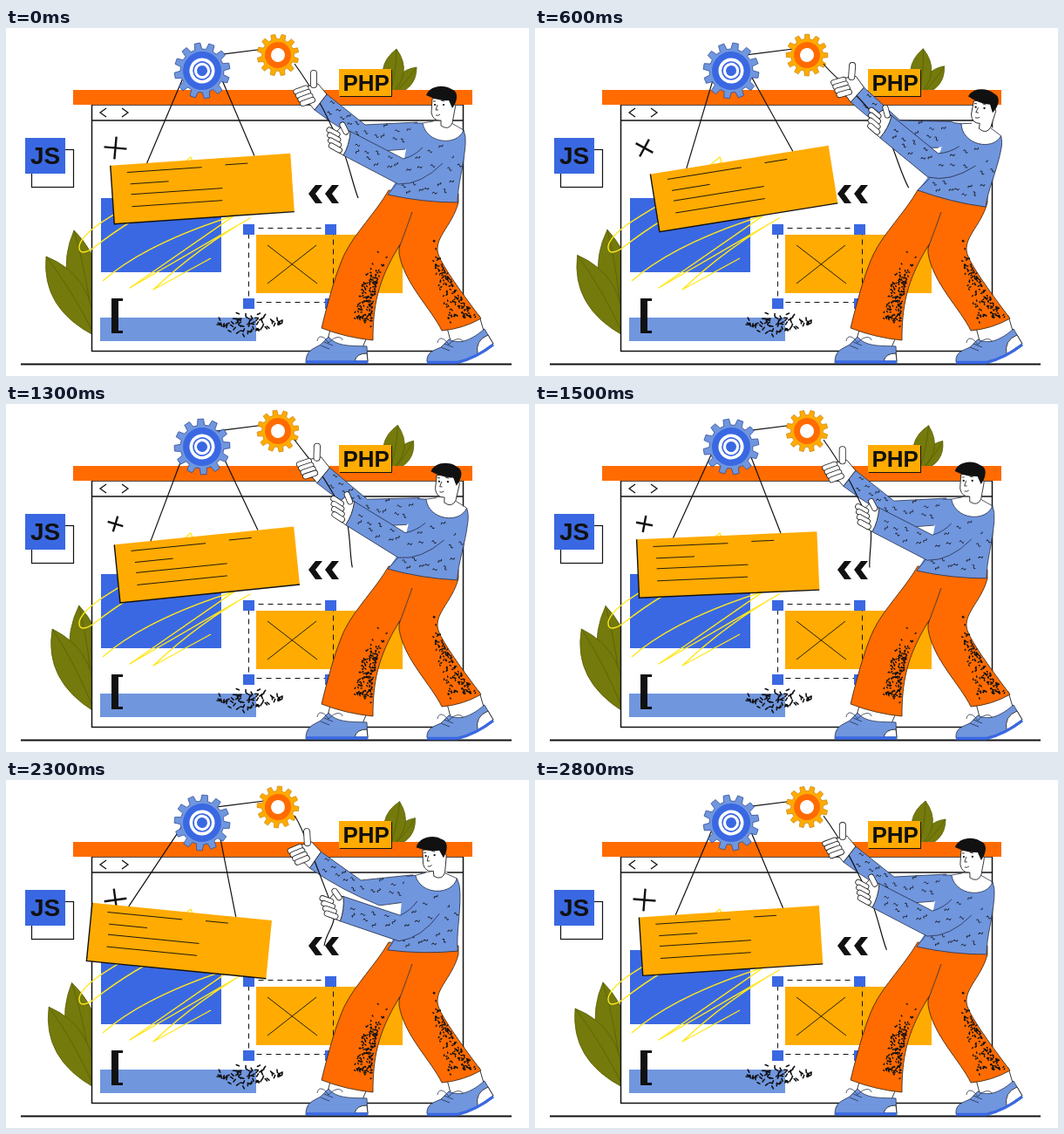
An HTML page for the animation above (2900 ms loop, 600x399 px).

```html
<!DOCTYPE html>
<html lang="en">
<head>
<meta charset="utf-8">
<title>Building a web page</title>
<style>
html, body { margin: 0; width: 100%; height: 100%; overflow: hidden; background: #fff; }
svg { display: block; width: 600px; height: 399px; }
text { font: bold 26px "Liberation Sans", Arial, sans-serif; fill: #111; }
.ink { fill: none; stroke: #111; }
.skin { fill: #fff; stroke: #222; stroke-width: .9; stroke-linejoin: round; }
.line { fill: none; stroke: #26304a; stroke-width: .8; stroke-linejoin: round; }
.pants { fill: #ff6b00; stroke: #33200a; stroke-width: .8; }
.leaf { fill: #747a0b; stroke: #5a6007; stroke-width: .8; }
.dots { fill: none; stroke: #111; stroke-linecap: round; }
.finger { fill: none; stroke-linecap: round; }
.blue { fill: #3a68e2; }
.soft { fill: #7096de; }
.gold { fill: #ffab02; }
</style>
</head>
<body>
<svg viewBox="0 0 600 399" xmlns="http://www.w3.org/2000/svg">
  <defs>
    <path id="laces" d="M-9 3l10 4M-5 -1l10 4M0 0C-6 -9 -12 -9 -13 -2M0 0C7 -8 15 -8 16 -3"/>
  </defs>
  <rect width="600" height="399" fill="#fff"/>
  <g id="leaves"></g>

  <!-- window -->
  <rect x="98.5" y="88" width="426" height="282.5" fill="#fff" stroke="#111" stroke-width="1.5"/>
  <path class="ink" d="M98 106H525" stroke-width="1.4"/>
  <rect x="77" y="71" width="458" height="17" fill="#ff6b00"/>
  <path class="ink" d="M115 92L108 97L115 102M133 92L140 97L133 102" stroke-width="1.3"/>

  <!-- labels -->
  <rect class="ink" x="29.5" y="139.5" width="48" height="43" stroke-width="1.2"/>
  <rect class="blue" x="22" y="126" width="46" height="41"/>
  <text x="28" y="156" style="font-size:28px">JS</text>
  <rect x="383" y="48" width="60" height="31" fill="#111"/>
  <rect class="gold" x="382" y="47" width="60" height="31"/>
  <text x="386.500" y="72">PHP</text>

  <!-- page items -->
  <rect class="blue" x="109" y="195" width="138" height="85"/>
  <rect class="soft" x="108" y="332" width="179" height="27"/>
  <path id="barDots" class="dots" stroke-width="1.6"/>
  <path d="M121 310H134V313H129V347H134V350H121Z" fill="#111"/>
  <path d="M200 158L212 148L214 153C180 190 90 222 84 250C83 262 96 256 103 250Q150 214 190 198M111 290Q160 247 262 215L142 298L280 218Q220 252 169 300L235 264" fill="none" stroke="#ffe71f" stroke-width="1.4" stroke-linejoin="round"/>
  <rect class="gold" x="287" y="237" width="168" height="67"/>
  <path class="ink" d="M300 249L357 293M356 249L300 293" stroke-width=".9"/>
  <rect class="ink" x="278.5" y="229.5" width="97" height="85" stroke-width="1" stroke-dasharray="6 5"/>
  <path class="blue" d="M272 225h13v12h-13zM366 225h13v12h-13zM272 310h13v12h-13zM366 310h13v12h-13z"/>
  <path d="M355 180h8l-8 10l8 11h-8l-8 -11zm19 0h8l-8 10l8 11h-8l-8 -11z" fill="#111"/>
  <path id="plus" class="ink" stroke-width="2.4"/>

  <!-- hanging board and gears -->
  <g id="board">
    <rect class="gold" x="-103.5" y="-33.5" width="207" height="67"/>
    <path class="ink" d="M-103.5 -33.5V33.5H103.5" stroke-width="1.4"/>
    <path class="ink" d="M-85 -24.5H1M28 -25.5H54M-82 -11H-38M-82 1H23M-82 15H22" stroke-width=".9"/>
  </g>
  <path id="ropes" class="ink" stroke-width="1.2"/>
  <g id="gearBlue">
    <path class="soft" stroke="#2c4a92" stroke-width=".7"/>
    <circle class="blue" r="22"/>
    <circle r="14.5" fill="#fff"/>
    <circle r="10" fill="none" stroke="#3a68e2" stroke-width="1.7"/>
    <circle class="blue" r="6"/>
  </g>
  <g id="gearGold">
    <path class="gold" stroke="#b87300" stroke-width=".5"/>
    <circle r="15" fill="#ff6b00"/>
    <circle r="8" fill="#fff"/>
  </g>

  <!-- ground and legs -->
  <path class="ink" d="M17 385.5H580" stroke-width="2"/>
  <path class="skin" d="M373 342L368 361L408 369L414 354ZM505 340L512 366L550 354L543 330Z"/>
  <g class="line">
    <path class="soft" d="M344 383C344 370 352 368 361 363L370 354C380 366 397 364 414 365L415 384H344Z"/>
    <path class="skin" d="M414 373Q402 373 400 382H415Z"/>
    <path class="soft" d="M483 383C482 372 490 370 499 366L508 357C522 364 536 356 549 345L559 362Q542 377 519 384Z"/>
    <path class="skin" d="M553 352Q538 358 541 374L559 362Z"/>
    <path d="M344 383H415M483 383.500H518Q540 378 559 363" stroke="#3a68e2" stroke-width="3.5"/>
    <use href="#laces" x="370" y="361"/>
    <use href="#laces" x="508" y="363"/>
  </g>
  <path class="pants" d="M452 185L519 190V200C512 228 488 242 497 262Q504 279 545 333Q524 345 500 347C488 322 456 292 451 258Z"/>
  <path class="pants" d="M439 186C424 212 400 235 388 260Q376 286 362 344Q390 355 421 358C421 320 426 290 451 250L490 190Z"/>
  <path d="M460 188H516L517 205L490 240L451 248Z" fill="#ff6b00"/>
  <path class="line" d="M466 211Q460 228 451 252"/>
  <path id="legDots" class="dots" stroke-width="1.4"/>

  <!-- upper body -->
  <g class="lean">
    <g class="far">
      <path class="soft" d="M368 76L412 111L472 108L492 125L458 139L432 141Q390 122 354 94Z"/>
      <path class="line" d="M472 108L412 111L368 76L354 94Q390 122 432 141L458 139"/>
      <path id="farDots" class="dots" stroke-width=".9"/>
    </g>
    <path d="M475 110L489 107L511 106L525 119L518 133H490Z" fill="#fff"/>
    <path class="soft" d="M466 109H478C482 133 518 136 525 117Q528 124 527 134C525 160 518 180 518 200Q478 200 438 191Q456 165 459 139Z"/>
    <path class="line" d="M468 109H478C482 133 518 136 525 117Q528 124 527 134C525 160 518 180 518 200Q478 200 438 191L450 176M478 109L490 107M511 109L525 117"/>
    <path id="bodyDots" class="dots" stroke-width=".9"/>
    <path class="skin" d="M489 81L488 97Q490 107 499 106V112Q508 118 512 109L515 93Q517 85 511 88L510 79Z"/>
    <path d="M482 77C486 66 502 64 511 70C520 73 518 84 512 92L508 83Q496 84 482 77Z" fill="#111"/>
    <path class="ink" d="M490 84h3M499 83l4 1M495 88l-2 6h3M493 100q3 1 5 -1" stroke-width=".8"/>
    <path class="dots" d="M492 88h.1M502 88h.1" stroke-width="2.2"/>
  </g>

  <path id="lead" class="ink" stroke-width="1.2"/>

  <g class="lean">
    <g class="far">
      <path class="skin" d="M368 76L358 64L340 68L338 84L349 88L354 94Z"/>
      <g id="fist"></g>
    </g>
    <g id="near">
      <path class="soft" d="M394 118L456 150L484 130L512 148Q482 180 450 179L387 146Z"/>
      <path class="line" d="M478 137Q468 147 456 150L394 118L387 146L450 179Q476 180 501 155"/>
      <path id="nearDots" class="dots" stroke-width=".9"/>
      <path class="skin" d="M395 119L384 114L374 124L376 139L387 146Q394 134 395 119Z"/>
      <g id="palm"></g>
    </g>
  </g>
</svg>
<script>
const LOOP = 2900, STEP = 100, REST = 2850, RAD = Math.PI / 180;
const $ = id => document.getElementById(id);
const set = (el, name, value) => el.setAttribute(name, value);
const turn = (el, a, x, y) => set(el, 'transform', `rotate(${a} ${x} ${y})`);
const n1 = v => v.toFixed(1);
const pt = p => n1(p[0]) + ' ' + n1(p[1]);

let seed = 11;
const rnd = () => (seed = seed * 16807 % 2147483647) / 2147483647;

const glide = (a, b, u) => a + (b - a) * (1 - Math.cos(Math.PI * Math.min(u, 1))) / 2;

// Rest, to one extreme, to the other, and back to rest.
function sway(t, rest, a, aAt, b, bAt) {
  if (t < aAt) return glide(rest, a, t / aAt);
  if (t < bAt) return glide(a, b, (t - aAt) / (bAt - aAt));
  return glide(b, rest, (t - bAt) / (REST - bAt));
}

function rotate([x, y], deg, [cx, cy]) {
  const c = Math.cos(deg * RAD), s = Math.sin(deg * RAD);
  return [cx + (x - cx) * c - (y - cy) * s, cy + (x - cx) * s + (y - cy) * c];
}

function gear(r, R) {
  const pts = [];
  for (let i = 0; i < 12; i++)
    for (const [o, q] of [[-9.5, r], [-6, R], [6, R], [9.5, r]])
      pts.push(pt(rotate([q, 0], i * 30 + o, [0, 0])));
  return 'M' + pts.join('L') + 'Z';
}

function leaf([bx, by], [tx, ty], w) {
  const dx = tx - bx, dy = ty - by, k = w / Math.hypot(dx, dy);
  const mid = s => pt([bx + dx * .55 - dy * k * s, by + dy * .55 + dx * k * s]);
  const base = pt([bx, by]), tip = pt([tx, ty]);
  $('leaves').insertAdjacentHTML('beforeend',
    `<path class="leaf" d="M${base}Q${mid(1)} ${tip}Q${mid(-1)} ${base}Q${mid(.15)} ${tip}"/>`);
  const el = $('leaves').lastElementChild;
  return a => turn(el, a, bx, by);
}

// A row of round-ended fingers, each one step further along.
function fingers(id, count, [x, y], [sx, sy], [lx, ly], w) {
  for (let i = 0; i < count; i++) {
    const d = `M${x + sx * i} ${y + sy * i}l${lx} ${ly}`;
    $(id).innerHTML += `<path class="finger" d="${d}" stroke="#222" stroke-width="${w}"/>` +
      `<path class="finger" d="${d}" stroke="#fff" stroke-width="${w - 1.7}"/>`;
  }
}

function dashes(count, len, place) {
  let d = '';
  for (let i = 0; i < count; i++) {
    const p = place(rnd(), rnd());
    d += `M${pt(p)}l${pt(rotate([len, 0], rnd() * 360, [0, 0]))}`;
  }
  return d;
}

// Small waves along a strip from a to b, scattered over its width.
function waves(count, a, b, width) {
  let d = '';
  for (let i = 0; i < count; i++) {
    const u = (i + rnd() * .6) / count, v = ((i % 2) + rnd() - 1) * width / 2;
    const len = Math.hypot(b[0] - a[0], b[1] - a[1]);
    const p = [a[0] + (b[0] - a[0]) * u - (b[1] - a[1]) / len * v,
               a[1] + (b[1] - a[1]) * u + (b[0] - a[0]) / len * v];
    const turnBy = rnd() * 120 - 60, to = q => pt(rotate(q, turnBy, [0, 0]));
    d += `M${pt(p)}q${to([1, -2.5])} ${to([2.5, 0])}t${to([2.5, 0])}`;
  }
  return d;
}

const swayBack = leaf([100, 346], [78, 232], 36);
const swayFront = leaf([102, 353], [46, 262], 36);
const swaySmall = leaf([443, 77], [471, 45], 17);
const swayTall = leaf([440, 78], [448, 24], 24);

fingers('fist', 1, [353, 65], [0, 0], [0, -13], 8);
fingers('fist', 4, [333, 73], [2.5, 4.5], [11, -4], 7);
fingers('palm', 1, [390, 119], [0, 0], [-4, -8], 7);
fingers('palm', 4, [371, 117], [.8, 6], [9, 5], 7);

set($('barDots'), 'd', dashes(65, 3.4, (u, v) =>
  rotate([Math.sqrt(u) * 37, 0], v * 360, [0, 0]).map((q, i) => i ? 339 + q * .34 : 280 + q)));
set($('legDots'), 'd',
  dashes(170, 1.2, (u, v) => {
    const k = Math.sqrt(u) * .6 + v * .4, edge = 444 - 25 * (1 - (1 - k) ** 2);
    return [edge - rnd() ** 1.6 * (12 + 10 * k), 247 + 98 * k];
  }) +
  dashes(150, 1.2, (u, v) => {
    const k = Math.sqrt(u), edge = 491 + 48 * k ** 1.4;
    return [edge - v ** 1.6 * 30 * k, 243 + 89 * k + 5 * v * k];
  }));
set($('farDots'), 'd', waves(9, [366, 88], [414, 122], 14) + waves(8, [422, 124], [470, 120], 20));
set($('bodyDots'), 'd', waves(7, [490, 140], [512, 166], 24) + waves(9, [452, 186], [512, 184], 18));
set($('nearDots'), 'd', waves(9, [398, 136], [448, 162], 20) + waves(5, [460, 164], [494, 144], 18));

const BLUE = [225, 49], GOLD = [312, 31];
const HIP = [478, 195], FAR = [470, 120], NEAR = [505, 150];
set($('gearBlue').firstElementChild, 'd', gear(25, 32));
set($('gearGold').firstElementChild, 'd', gear(18.5, 24));

// Where a line from p touches a circle around c.
function touch(p, c, r, side) {
  const dx = p[0] - c[0], dy = p[1] - c[1];
  const a = Math.atan2(dy, dx) + side * Math.acos(r / Math.hypot(dx, dy));
  return [c[0] + r * Math.cos(a), c[1] + r * Math.sin(a)];
}

function drawBoard(t) {
  const a = sway(t, -3.9, -10, 800, 5.8, 2250);
  const c = [214.4 - 2.79 * a, 184.2];
  set($('board'), 'transform', `translate(${c}) rotate(${a})`);
  const rope = (x, side) => {
    const hook = rotate([c[0] + x, c[1] - 33.5], a, c);
    return `M${pt(hook)}L${pt(touch(hook, BLUE, 17, side))}`;
  };
  set($('ropes'), 'd', rope(-61.5, 1) + rope(62, -1) + 'M225 33L312 22');
}

function drawMan(t) {
  const lean = sway(t, 0, 7.6, 680, -6, 2180);
  const far = -.45 * lean, near = .6 * lean, reach = -.5 * lean;
  document.querySelectorAll('.lean').forEach(g => turn(g, lean, ...HIP));
  document.querySelectorAll('.far').forEach(g =>
    set(g, 'transform', `translate(${reach}) rotate(${far} ${FAR})`));
  turn($('near'), near, ...NEAR);
  set($('gearBlue'), 'transform', `translate(${BLUE}) rotate(${lean * 2.6 + 20})`);
  set($('gearGold'), 'transform', `translate(${GOLD}) rotate(${lean * 2 + 16})`);

  const [fx, fy] = rotate([360, 86], far, FAR);
  const fist = rotate([fx + reach, fy], lean, HIP);
  const palm = rotate(rotate([380, 125], near, NEAR), lean, HIP);
  const end = [palm[0] + sway(t, 24, 36, 500, -12, 2150),
               palm[1] + sway(t, 70, 81, 800, 45, 2150)];
  const start = [331, 41];
  const pull = [(palm[0] - start[0]) / 4, (palm[1] - start[1]) / 4];
  const along = (p, k) => pt([p[0] + pull[0] * k, p[1] + pull[1] * k]);
  const drop = pt([end[0] - (end[0] - palm[0]) * .3, end[1] - 18]);
  set($('lead'), 'd', `M${pt(start)}C${pt([339, 52])} ${along(fist, -.6)} ${pt(fist)}` +
    `C${along(fist, .6)} ${along(palm, -.6)} ${pt(palm)}C${along(palm, .9)} ${drop} ${pt(end)}`);
}

function drawRest(t) {
  swayBack(sway(t, 0, 3.8, 1000, -1.5, 2100));
  swayFront(sway(t, 0, 4.5, 1450, 2, 2250));
  swayTall(sway(t, 0, -3, 700, 6, 1900));
  swaySmall(sway(t, 0, -6, 1300, -3, 2200));
  const s = sway(t, 13, 9.2, 1250, 13, 2400);
  set($('plus'), 'd', `M${-s} 0H${s}M0 ${-s}V${s}`);
  set($('plus'), 'transform', `translate(125.5 137.5) rotate(${sway(t, 5, 29, 650, -8, 2350)})`);
}

const begin = performance.now();
function tick() {
  const ms = Math.max(0, performance.now() - begin);
  const t = Math.floor(ms % LOOP / STEP) * STEP;
  drawBoard(t);
  drawMan(t);
  drawRest(t);
  requestAnimationFrame(tick);
}
tick();
</script>
</body>
</html>
```
